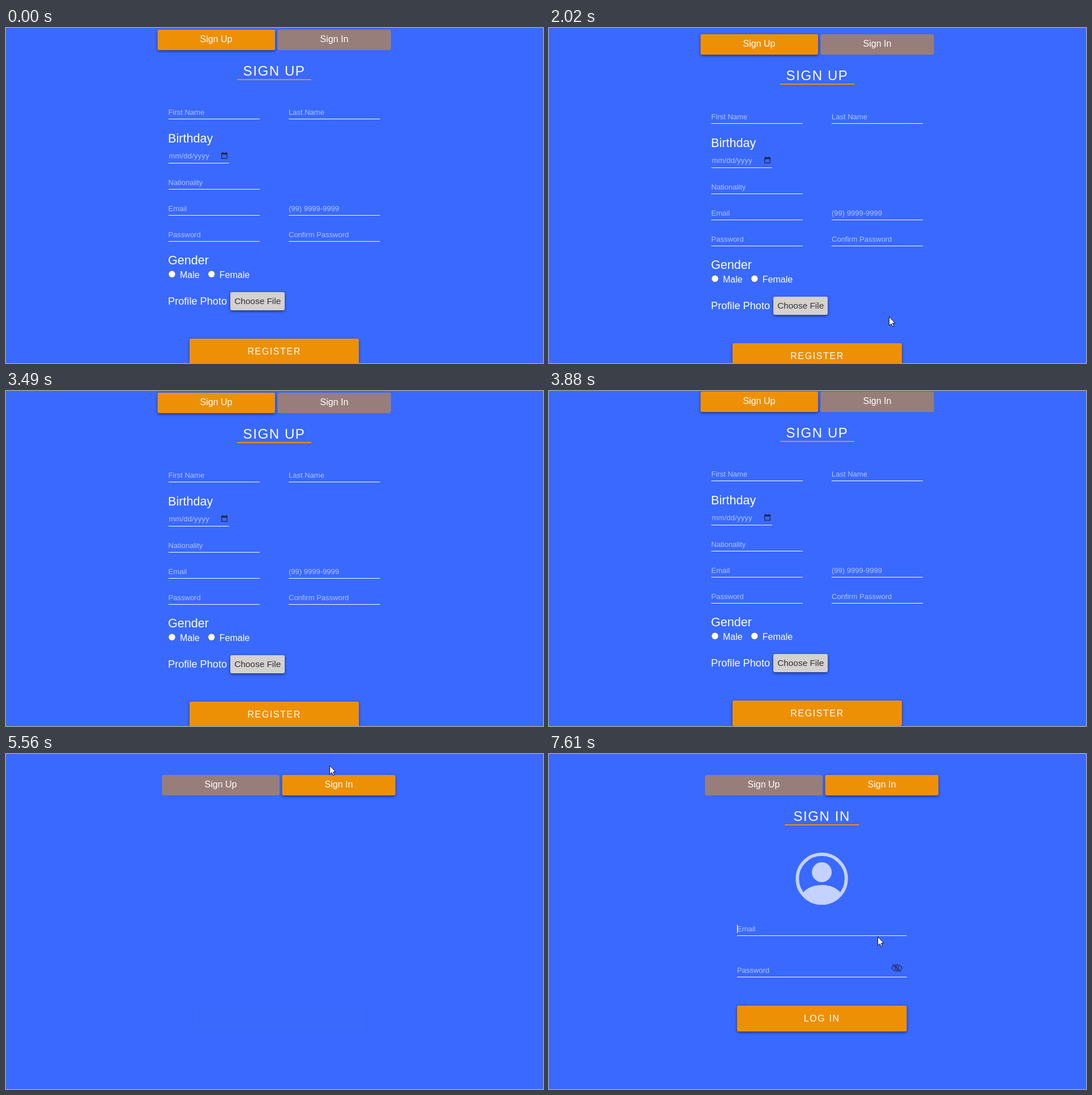
Animation of 948x591 px, one loop 8 s. Source, as an HTML page with a canvas:

```html
<!DOCTYPE html>
<html lang="en">
<head>
<meta charset="utf-8">
<title>Sign up form</title>
<style>
  html, body { margin: 0; width: 100%; height: 100%; overflow: hidden; background: #3969ff; }
  canvas { display: block; }
</style>
</head>
<body>
<canvas id="stage" width="948" height="591"></canvas>
<script>
const ctx = document.getElementById('stage').getContext('2d');
const LOOP = 8000;
const SWITCH = 5560;
const BLUE = [57, 105, 255];
const ORANGE = '#ee9006';
const BROWN = '#987e7a';
const HINT = 'rgba(255,255,255,0.6)';

// [time, page offset]
const scroll = [
  [1600, 0], [1680, -1], [1749, -1], [1810, -4.6], [1890, -4.6], [1950, -2],
  [2010, 6], [2080, 19], [2160, 28], [2230, 32], [2300, 33.5],
  [3360, 33.5], [3420, 20], [3490, 0], [3549, 0], [3610, -1],
  [3810, -1], [3880, -2], [4140, -2], [4210, -3], [4480, -3], [4680, -4.6]
];

// [time, x, y] for each stretch in which the pointer is on the stage
const trails = [
  [[660, 885, 578], [830, 800, 558], [1000, 660, 524], [1150, 602, 513],
   [1350, 602, 513], [1480, 600, 509], [2400, 600, 509], [2450, 598, 504],
   [2580, 585, 470], [2760, 640, 330], [2950, 806, 106], [3010, 806, 106]],
  [[5290, 700, 50], [5360, 640, 34], [5480, 572, 21], [5640, 570, 20],
   [5770, 650, 60], [5910, 749, 100], [5979, 749, 100], [6050, 734, 146],
   [6140, 722, 170], [6330, 650, 255], [6520, 588, 314], [6700, 583, 320],
   [6880, 580, 322], [8000, 580, 322]]
];

function sample(keys, t) {
  if (t <= keys[0][0]) return keys[0].slice(1);
  for (let i = 1; i < keys.length; i++) {
    const a = keys[i - 1], b = keys[i];
    if (t < b[0]) {
      const k = (t - a[0]) / (b[0] - a[0]);
      return a.slice(1).map((v, j) => v + (b[j + 1] - v) * k);
    }
  }
  return keys[keys.length - 1].slice(1);
}

let offset = 0;
const row = y => Math.round(y + offset);

function text(str, x, y, size, color = '#fff', spacing = 0, align = 'left') {
  ctx.font = `${size}px "Liberation Sans", Arial, sans-serif`;
  ctx.letterSpacing = spacing + 'px';
  ctx.fillStyle = color;
  if (align === 'center') x -= ctx.measureText(str).width / 2;
  ctx.fillText(str, x, row(y));
  ctx.letterSpacing = '0px';
}

function box(x, y, w, h, color, raised) {
  ctx.save();
  if (raised) {
    ctx.shadowColor = 'rgba(0,0,0,0.5)';
    ctx.shadowBlur = 5;
    ctx.shadowOffsetY = 2;
  }
  ctx.fillStyle = color;
  ctx.beginPath();
  ctx.roundRect(x, row(y), w, h, 3);
  ctx.fill();
  ctx.restore();
}

function rule(x, y, w, color = '#fff', h = 1) {
  ctx.fillStyle = color;
  ctx.fillRect(x, row(y), w, h);
}

function field(label, x, y, w) {
  text(label, x, y, 13, HINT);
  rule(x, y + 7, w);
}

function circle(x, y, r, color) {
  ctx.fillStyle = color;
  ctx.beginPath();
  ctx.arc(x, y, r, 0, 7);
  ctx.fill();
}

function tabs(x, second) {
  box(x, 3.2, 207.5, 36, second ? BROWN : ORANGE, !second);
  box(x + 212, 3.2, 200, 36, second ? ORANGE : BROWN, second);
  text('Sign Up', x + 103.5, 25.2, 16, '#fff', 0, 'center');
  text('Sign In', x + 312, 25.2, 16, '#fff', 0, 'center');
}

function heading(str, cx) {
  text(str, cx, 84.2, 24, '#fff', 1.6, 'center');
  rule(cx - 65.5, 90.2, 131, ORANGE, 2);
}

function radio(x, label) {
  const y = row(433.8) + 0.2;
  circle(x, y, 6.5, '#767676');
  circle(x, y, 5.6, '#fff');
  text(label, x + 14, 440.8, 16);
}

function calendar(x, y) {
  ctx.fillStyle = ctx.strokeStyle = '#20284c';
  ctx.lineWidth = 1.3;
  ctx.strokeRect(x + 0.8, y + 2, 9.4, 9);
  ctx.fillRect(x, y + 1.4, 11, 3);
  ctx.fillRect(x + 2, y, 1.4, 2);
  ctx.fillRect(x + 7.6, y, 1.4, 2);
}

function signUp() {
  tabs(267.5, false);
  heading('SIGN UP', 473.5);
  field('First Name', 286.6, 152.8, 161.4);
  field('Last Name', 499, 152.8, 161);
  text('Birthday', 286, 201.8, 21.6);
  text('mm/dd/yyyy', 287.5, 229.8, 13, HINT, 0.2);
  calendar(380, row(218.8));
  rule(286.6, 237.8, 107);
  field('Nationality', 286.6, 276.8, 161.4);
  field('Email', 286.6, 322.8, 161.4);
  field('(99) 9999-9999', 499, 322.8, 161);
  field('Password', 286.6, 368.8, 161.4);
  field('Confirm Password', 499, 368.8, 161);
  text('Gender', 286, 416.8, 21.6);
  radio(293, 'Male');
  radio(362.8, 'Female');
  text('Profile Photo', 286, 487.8, 18.2);
  box(396, 465.8, 96, 32, '#d4d1ce', true);
  text('Choose File', 444.2, 486.8, 15.4, '#30303a', 0, 'center');
  box(324, 548.2, 299, 45, ORANGE, true);
  text('REGISTER', 473.5, 576.2, 16, '#fff', 1.6, 'center');
}

function avatar(x, y, fade) {
  const color = `rgb(${BLUE.map(v => Math.round(v + (255 - v) * 0.7 * fade))})`;
  ctx.save();
  ctx.beginPath();
  ctx.arc(x, y, 46, 0, 7);
  ctx.clip();
  ctx.fillStyle = color;
  ctx.beginPath();
  ctx.ellipse(x, y + 35, 36.5, 24, 0, 0, 7);
  ctx.fill();
  ctx.restore();
  circle(x, y - 11.5, 17.5, color);
  ctx.strokeStyle = color;
  ctx.lineWidth = 5.8;
  ctx.beginPath();
  ctx.arc(x, y, 43.2, 0, 7);
  ctx.stroke();
}

function hiddenEye(x, y) {
  ctx.strokeStyle = '#1e2a58';
  ctx.lineWidth = 1.2;
  ctx.beginPath();
  ctx.moveTo(x - 9, y);
  ctx.bezierCurveTo(x - 5, y - 7.5, x + 5, y - 7.5, x + 9, y);
  ctx.bezierCurveTo(x + 5, y + 7.5, x - 5, y + 7.5, x - 9, y);
  ctx.moveTo(x + 3.2, y);
  ctx.arc(x, y, 3.2, 0, 7);
  ctx.moveTo(x - 7, y - 6.5);
  ctx.lineTo(x + 7, y + 6.5);
  ctx.stroke();
}

function signIn(t) {
  const left = 1 - Math.min(1, (t - SWITCH) / 490);
  const fade = 1 - left * left;
  tabs(275.5, true);
  avatar(481.6, 220, fade);
  ctx.globalAlpha = fade;
  heading('SIGN IN', 481.7);
  field('Email', 332, 279.5, 299.5);
  field('Password', 332, 352.5, 299.5);
  hiddenEye(614, 377.5);
  box(332, 410.5, 299.5, 45.5, ORANGE, true);
  text('LOG IN', 481.7, 438.5, 16, '#fff', 1.6, 'center');
  ctx.globalAlpha = 1;
  const caretOn = (t >= 6580 && t < 7080) || t >= 7610;
  if (caretOn) {
    ctx.fillStyle = '#fff';
    ctx.fillRect(332, 301, 1, 15);
  }
}

function pointer(t) {
  const keys = trails.find(k => t >= k[0][0] && t < k[k.length - 1][0]);
  if (!keys) return;
  const [x, y] = sample(keys, t).map(Math.round);
  ctx.save();
  ctx.translate(x + 0.5, y + 0.5);
  ctx.beginPath();
  ctx.moveTo(0, 0);
  ctx.lineTo(0, 15.5);
  ctx.lineTo(3.6, 12.2);
  ctx.lineTo(6, 17.5);
  ctx.lineTo(8.2, 16.6);
  ctx.lineTo(5.9, 11.3);
  ctx.lineTo(10.6, 11.3);
  ctx.closePath();
  ctx.fillStyle = '#fff';
  ctx.fill();
  ctx.strokeStyle = '#101020';
  ctx.lineWidth = 1;
  ctx.stroke();
  ctx.restore();
}

function draw(t) {
  ctx.fillStyle = `rgb(${BLUE})`;
  ctx.fillRect(0, 0, 948, 591);
  if (t < SWITCH) {
    offset = sample(scroll, t)[0];
    signUp();
  } else {
    offset = 33.5;
    signIn(t);
  }
  pointer(t);
}

const start = performance.now();
function tick() {
  draw((performance.now() - start) % LOOP);
  requestAnimationFrame(tick);
}
tick();
</script>
</body>
</html>
```
